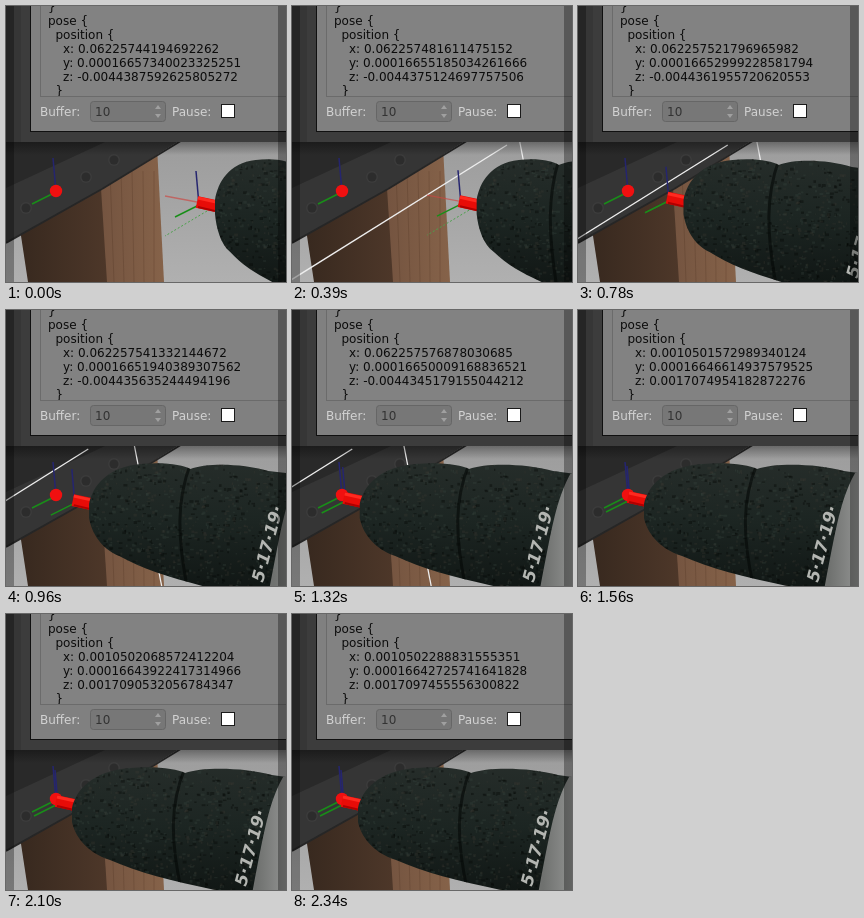
Recreate the animation shown at these times as an HTML page with a canvas. Size 280 by 276 pixels, loop 2.37 s.

```html
<!DOCTYPE html>
<html lang="en">
<head>
<meta charset="utf-8">
<title>Drill alignment</title>
<style>
html, body { margin: 0; overflow: hidden; background: #333; }
canvas { display: block; }
</style>
</head>
<body>
<canvas id="stage" width="280" height="276"></canvas>
<script>
const ctx = document.getElementById('stage').getContext('2d');
const LOOP = 2370, STEP = 30;
const SELECT = 180, SNAP = 1470;   // selection box shown; drill snaps home
const FONT = '12px "DejaVu Sans", sans-serif';

// Readings: time, x, y, z; linear in between
const approach = [
  [0,    0.06225744194692262,  0.00016657340023325251, -0.0044387592625805272],
  [390,  0.062257481611475152, 0.00016655185034261666, -0.0044375124697757506],
  [630,  0.062257505517650413, 0.00016653881594643654, -0.0044366625117019387],
  [960,  0.062257541332144672, 0.00016651940389307562, -0.004435635244494196],
  [1320, 0.062257576878030685, 0.00016650009168836521, -0.0044345179155044212]
];
const docked = [
  [1860, 0.0010501848313269058, 0.00016645119092988103, 0.0017083608557267871],
  [2340, 0.0010502288831555351, 0.00016642725741641828, 0.0017097455556300822]
];

function readings(t) {
  const keys = t < SNAP ? approach : docked;
  let i = 0;
  while (i < keys.length - 2 && t >= keys[i + 1][0]) i++;
  const [a, b] = [keys[i], keys[i + 1]];
  const u = (t - a[0]) / (b[0] - a[0]);
  return a.slice(1).map((v, j) => u === 1 ? b[j + 1] : v + (b[j + 1] - v) * u);
}

// Share of the way still to go: 1 at rest far out, 0 when docked
const distance = t => Math.exp(-((Math.max(0, t - 150) * .0018) ** 2));
const smooth = u => u * u * (3 - 2 * u);

function rect(x, y, w, h, fill) {
  ctx.fillStyle = fill;
  ctx.fillRect(x, y, w, h);
}
function poly(points, fill) {
  ctx.beginPath();
  points.forEach(p => ctx.lineTo(...p));
  ctx.fillStyle = fill;
  ctx.fill();
}
function line(x1, y1, x2, y2, color, width = 1) {
  ctx.beginPath();
  ctx.moveTo(x1, y1);
  ctx.lineTo(x2, y2);
  ctx.strokeStyle = color;
  ctx.lineWidth = width;
  ctx.stroke();
}
function dot(x, y, r, fill) {
  ctx.beginPath();
  ctx.arc(x, y, r, 0, 7);
  ctx.fillStyle = fill;
  ctx.fill();
}
function gradient(x1, y1, x2, y2, ...colors) {
  const g = ctx.createLinearGradient(x1, y1, x2, y2);
  colors.forEach((c, i) => g.addColorStop(i / (colors.length - 1), c));
  return g;
}
function label(text, x, y, color) {
  ctx.fillStyle = color;
  ctx.fillText(text, x, y);
}
function random(seed) {
  return () => (seed = seed * 16807 % 2147483647) / 2147483647;
}

function drawScene() {
  rect(0, 0, 280, 276, gradient(0, 135, 0, 276, '#9c9c9c', '#b0b0b0'));
  poly([[12, 210], [97, 175], [102, 276], [22, 276]], gradient(16, 0, 100, 0, '#38291f', '#4d3729'));
  poly([[95, 182], [151, 140], [158, 276], [101, 276]], gradient(95, 0, 156, 0, '#745440', '#856249'));
  for (let i = 0; i < 5; i++) line(104 + i * 11, 165, 108 + i * 10, 276, 'rgba(60,38,24,.2)');
  poly([[0, 130], [181, 130], [96, 183], [0, 237]], '#353535');
  poly([[0, 130], [112, 130], [0, 182]], '#292929');
  line(0, 237, 96, 183, '#262626', 2);
  line(96, 183, 178, 133, '#262626', 2);
  for (const [x, y] of [[20, 202], [80, 171], [108, 154]]) {
    dot(x, y, 6, '#3c3c3c');
    dot(x, y, 4.5, '#2c2c2c');
  }
}

function drawSelection(d) {
  const shift = smooth(Math.min(1, 2 * d));
  const x = 60 + 155 * shift, edge = 111 + 116 * shift;
  line(x, 139, x - 240, 139 + 150, '#eee', 1.3);
  line(edge, 132, edge + 28, 276, '#eee', 1.3);
}

function drawAxes(x, y) {
  line(x, y, x - 3, y - 34, '#25256f', 1.5);
  line(x, y, x - 24, y + 12, '#198f19', 1.5);
}

function drawDrill(nose, d) {
  // The body is seen more from the front while it is far out
  const low = 1 - .6 * Math.sqrt(d), high = (1 + low) / 2;
  const curve = (k, ...p) => ctx.bezierCurveTo(...p.map((v, i) => i % 2 ? v : v * k));
  ctx.save();
  ctx.translate(nose, 200);
  ctx.beginPath();
  ctx.moveTo(0, -6);
  curve(high, 4, -24, 20, -43, 58, -46);
  curve(high, 85, -48, 105, -45, 113, -41);
  curve(high, 130, -47, 170, -47, 200, -39);
  ctx.lineTo(340, -20);
  ctx.lineTo(340, 130);
  ctx.lineTo(143 * low + 100, 98);
  ctx.lineTo(143 * low, 76);
  curve(low, 100, 67, 65, 58, 38, 46);
  curve(low, 14, 38, 3, 22, 0, 8);
  ctx.fillStyle = gradient(0, -50, 0, 76, '#262d2a', '#1c2522', '#111715');
  ctx.fill();
  ctx.clip();

  const rnd = random(77);
  const tones = ['rgba(58,70,64,.3)', 'rgba(5,9,7,.4)', 'rgba(64,60,52,.25)'];
  for (let i = 0; i < 1200; i++) {
    rect(rnd() * 240, rnd() * 130 - 52, 1 + rnd() * 3, 1 + rnd() * 2, tones[i % 3]);
  }
  ctx.beginPath();
  ctx.moveTo(113 * high, -46);
  ctx.bezierCurveTo(98 * high, -10, 98 * high, 25, 110 * high, 80);
  ctx.strokeStyle = 'rgba(4,8,6,.6)';
  ctx.lineWidth = 3;
  ctx.stroke();

  // Pale rear cap and the print along its rim
  ctx.beginPath();
  ctx.moveTo(216, -45);
  ctx.bezierCurveTo(196, -15, 192, 20, 180, 80);
  ctx.lineTo(340, 80);
  ctx.lineTo(340, -45);
  ctx.fillStyle = gradient(185, 0, 220, 0, '#6f716f', '#989998');
  ctx.fill();
  ctx.translate(174, 73);
  ctx.rotate(-1.31);
  ctx.font = 'italic bold 17px "DejaVu Sans", sans-serif';
  label('5·17·19·', 0, 0, '#b4b6b2');
  ctx.restore();
}

function drawRod(x, y) {
  line(x, y, x + 19, y + 4, '#e80c08', 12);
  line(x + 1, y - 4, x + 19, y, '#ff2a20', 3);
  line(x + 1, y + 5, x + 18, y + 9, '#b00000', 2);
}

function drawDialog(t) {
  rect(0, 135, 280, 14, gradient(0, 135, 0, 149, 'rgba(0,0,0,.35)', 'rgba(0,0,0,0)'));
  rect(0, 0, 15, 136, '#363636');
  rect(15, 0, 265, 136, '#3c3c3c');
  rect(24, 0, 256, 126, '#101010');
  rect(25, 0, 255, 125, '#808080');
  rect(34, -5, 246, 96, '#6b6b6b');
  rect(35, -5, 245, 95, '#828282');

  const ink = '#0c0c0c';
  ctx.font = FONT;
  ctx.save();
  ctx.beginPath();
  ctx.rect(34, 0, 246, 90);
  ctx.clip();
  label('}', 42, 5, ink);
  label('pose {', 42, 19, ink);
  label('position {', 49.5, 33, ink);
  readings(t).forEach((v, i) => {
    label('xyz'[i] + ': ' + v.toPrecision(17).replace(/0+$/, ''), 57, 47 + 14 * i, ink);
  });
  label('}', 49.5, 89, ink);
  ctx.restore();

  label('Buffer:', 34, 110, '#d2d2d2');
  label('Pause:', 166, 110, '#d2d2d2');
  ctx.beginPath();
  ctx.roundRect(84.5, 95.5, 75, 20, 3);
  ctx.fillStyle = '#777';
  ctx.fill();
  ctx.strokeStyle = '#666';
  ctx.lineWidth = 1;
  ctx.stroke();
  label('10', 89, 110, '#333');
  poly([[149, 103], [155, 103], [152, 99]], '#a0a0a0');
  poly([[149, 108], [155, 108], [152, 112]], '#a0a0a0');
  rect(215, 98, 14, 14, '#1a1a1a');
  rect(216, 99, 12, 12, '#fff');
}

function draw(t) {
  const d = t < SNAP ? distance(t) : 0;
  const nose = 66 + 143 * d, x = nose - 16 - 2 * d, y = 187 + 9 * Math.sqrt(d);
  drawScene();
  if (t >= SELECT && t < SNAP) drawSelection(d);
  drawAxes(50, 186);
  drawAxes(x + 2, y + 3);
  if (d > .3) {
    line(x, y, x - 32, y - 6, 'rgba(205,70,65,.65)', 1.3);
    ctx.setLineDash([2, 2]);
    line(x + 10, y + 9, x - 32, y + 34, '#4ba04b');
    ctx.setLineDash([]);
  }
  dot(50, 185, 6.2, '#f01010');
  drawRod(x, y);
  drawDrill(nose, d);
  drawDialog(t);
  for (const side of [0, 272]) rect(side, 0, 8, 276, 'rgba(0,0,0,.32)');
}

function tick() {
  const t = performance.now() % LOOP;
  draw(Math.floor(t / STEP) * STEP);
  requestAnimationFrame(tick);
}
tick();
</script>
</body>
</html>
```
